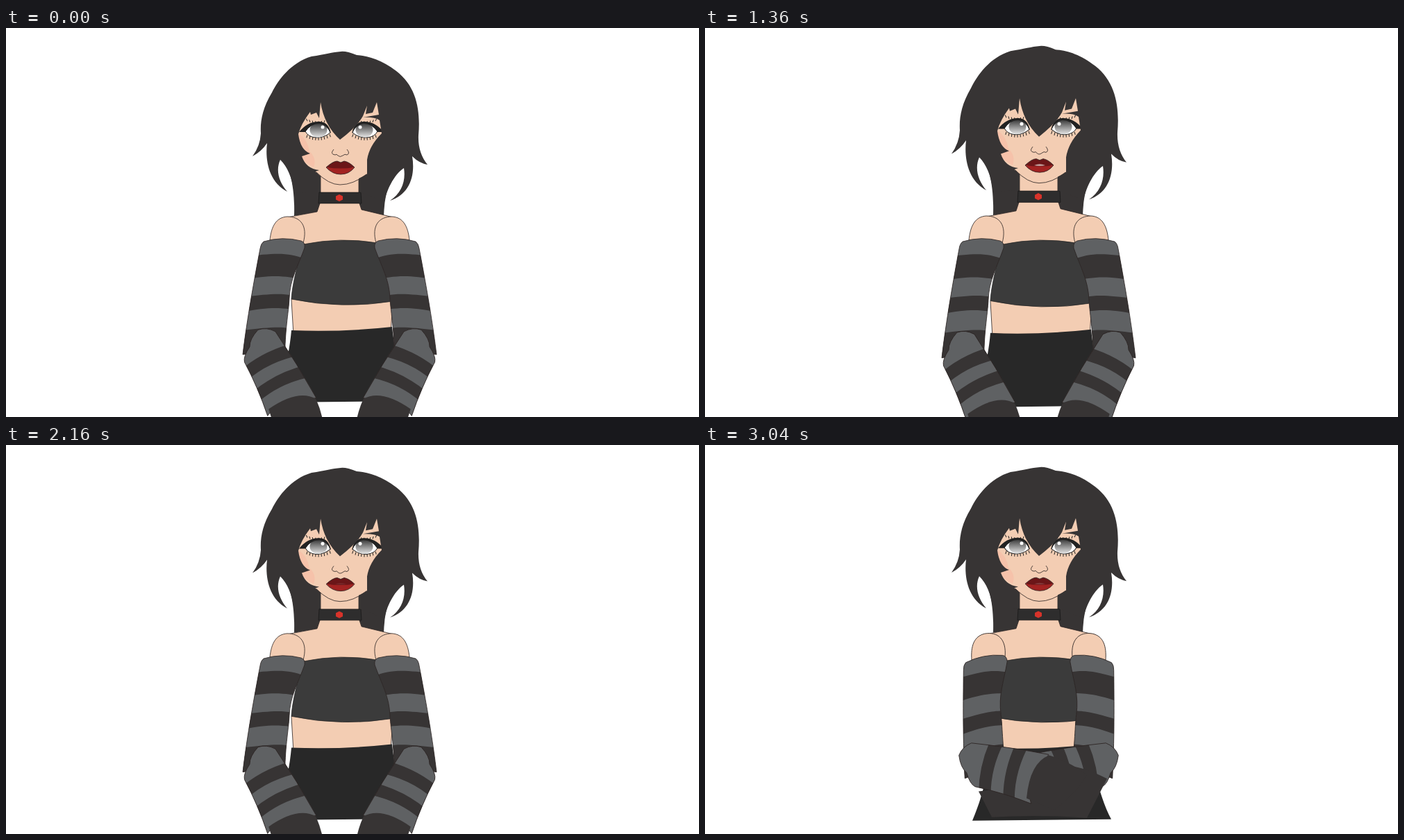
An HTML page for the animation above (3.08 s loop, 998x561 px).

```html
<!DOCTYPE html>
<html lang="en">
<head>
<meta charset="utf-8">
<title>Striped sleeves</title>
<style>
html, body { margin: 0; width: 100%; height: 100%; overflow: hidden; background: #fff; }
svg { display: block; width: 100vw; height: 100vh; }
.line { fill: none; stroke: #2b2322; stroke-width: .8; }
.skin { fill: #f3cdb3; stroke: #2b2322; stroke-width: .8; }
.dark { fill: #373434; }
.gray { fill: #5f6163; }
</style>
</head>
<body>
<svg viewBox="0 0 998 561">
  <defs>
    <linearGradient id="iris" x1="0" y1="0" x2="0" y2="1">
      <stop offset=".1" stop-color="#444"/><stop offset="1" stop-color="#e4e4e4"/>
    </linearGradient>
    <path id="sleeve" d="M531 317Q530 309 536 307Q563 300 590 308Q594 311 595 318C603 360 614 420 620 471Q590 463 559 475C560 440 554 410 553 390C552 362 541 345 531 317Z"/>
    <path id="cuff" d="M-26 25Q-20 8 -10 3Q-2 -12 6 -14Q48 -14 90 -21L84 -8L100 53Q45 52 -12 46Q-24 38 -26 25Z"/>
    <clipPath id="sleeveClip"><use href="#sleeve"/></clipPath>
    <clipPath id="cuffClip"><use href="#cuff"/></clipPath>
    <g id="upperArm">
      <path class="skin" d="M533 310C526 285 537 272 556 272C572 273 579 286 581 306Z"/>
      <use href="#sleeve" class="gray"/>
      <g id="sleeveBands" class="dark" clip-path="url(#sleeveClip)"></g>
      <use href="#sleeve" class="line"/>
    </g>
    <g id="forearm">
      <use href="#cuff" class="gray"/>
      <g id="cuffBands" class="dark" clip-path="url(#cuffClip)"></g>
      <use href="#cuff" class="line"/>
      <path class="dark" d="M82 -15L124 -23Q150 4 160 36Q130 50 101 52Q76 36 82 -15Z"/>
    </g>
    <g id="eye">
      <path fill="#fff" stroke="#222" d="M-18 1Q-10 -11 3 -11Q14 -10 18 3Q8 11 -3 10Q-14 9 -18 1Z"/>
      <ellipse cx="1" cy="-1" rx="12.5" ry="10.5" fill="url(#iris)"/>
      <circle cx="7" cy="-5" r="2.5" fill="#fff"/>
      <path fill="#222" d="M-27 2Q-14 -14 3 -13Q16 -12 19 4Q12 -9 2 -10Q-10 -10 -18 2Z"/>
      <path class="lashes" stroke="#222" fill="none"/>
    </g>
  </defs>

  <g id="figure">
    <path class="dark" d="M388 170C412 200 416 235 415 271L480 260L544 271C545 240 552 215 576 180Z"/>
    <path class="skin" d="M453 205V250L448 265L400 274L425 330L411 392L414 442H554L557 392L538 330L562 274L512 262L508 250V205Z"/>
    <path fill="#3b3b3b" stroke="#222" stroke-width=".7" d="M428 312Q482 301 535 310C545 335 562 345 566 362L558 394Q484 406 411 391C412 370 420 340 428 312Z"/>
    <path fill="#282828" d="M411 436Q482 439 556 431C560 470 570 510 585 538L385 540C400 505 408 470 411 436Z"/>
    <path fill="#2e2d2d" stroke="#111" stroke-width=".6" d="M451 237H511L512 253H450Z"/>
    <path fill="#d8332a" d="M480 240L485 242.500V247.500L480 250L475 247.500V242.500Z"/>

    <g id="head">
      <path fill="#f3cdb3" d="M420 100H543V190L519 211Q500 226 481 226Q465 226 447 208L420 190Z"/>
      <path fill="#f6c2aa" d="M421 152Q434 160 437 178Q448 188 443 201L425 190Z"/>
      <path class="line" d="M447 208Q465 226 481 226Q500 226 519 211"/>
      <path class="line" d="M472 175Q466 182 474 183Q476 181 478 184Q481 187 485 184Q488 181 491 183Q496 181 491 175"/>
      <use href="#eye" x="449" y="148"/>
      <use href="#eye" transform="translate(517 148) scale(-1 1)"/>
      <path fill="#6b1618" d="M461 201Q471 192 477 192L482 194L487 192Q494 193 502 201Q482 207 461 201Z"/>
      <path fill="#a22322" d="M461 201Q482 204 502 201Q494 211 482 211Q470 211 461 201Z"/>
      <path class="line" d="M461 201Q471 192 477 192L482 194L487 192Q494 193 502 201Q494 211 482 211Q470 211 461 201Z"/>
      <path id="teeth" fill="#d9c4c0" d="M474 201Q482 198 490 201Q482 203 474 201Z"/>
      <path class="dark" d="M482 34C470 35 460 38 440 41C410 50 392 75 383 93C369 116 366 135 367 152Q366 170 355 185Q368 178 376 166C373 190 378 222 405 236C393 222 388 205 395 190C405 200 412 215 415 238L453 236V214L443 208L451 205Q432 203 426 185L438 181Q424 176 421 153Q425 138 438 121L439 125L447 122L451 130L453 107Q458 140 481 161Q505 143 514 127L520 112L518 124L528 122L534 107L537 125L514 129Q530 128 538 133L541 152Q523 170 520 190V211L508 217V236L545 250C548 235 558 212 573 202C576 220 570 238 553 249C580 240 590 215 585 185Q595 195 607 197Q593 180 594 155C597 120 592 85 562 62C540 45 520 40 505 39Q490 33 482 34Z"/>
    </g>

    <g id="rightArm"><use href="#upperArm"/><use href="#forearm" class="fore"/></g>
    <path id="folded" class="dark" d="M394 498L413 535Q480 531 550 536L579 480Q545 462 518 461L470 490Z"/>
    <g transform="translate(961 0) scale(-1 1)">
      <g id="leftArm"><use href="#upperArm"/><use href="#forearm" class="fore"/></g>
    </g>
  </g>
</svg>
<script>
const LOOP = 3080, STEP = 40;
const $ = id => document.getElementById(id);

// Keys are [time, value] pairs
const stretchKeys = [[0, 0], [80, 0], [240, 28], [340, 17], [440, 9], [580, 0], [800, 12], [920, 6],
  [1000, 4], [1120, 0], [1290, 12], [1360, 8], [1500, 2], [1560, 0], [1640, 6], [1780, 24], [1880, 17],
  [1980, 9], [2120, 0], [2340, 12], [2480, 6], [2640, 0], [2840, 12], [2900, 10], [3040, 2], [3080, 0]];
const swingKeys = [[0, 0], [90, 0], [240, 1.25], [340, .95], [440, .64], [600, 0],
  [1570, 0], [1780, 1.25], [1880, 1], [1980, .62], [2140, 0], [3080, 0]];
const foldKeys = [[0, 0], [1390, 0], [1480, 1], [1530, 1], [1560, 0], [2880, 0], [3000, 1], [3080, 1]];

// Smooth curve through the keys, flat at peaks and rests
function slope(keys, i) {
  const a = keys[i - 1], b = keys[i], c = keys[i + 1];
  if (!a || !c || (b[1] - a[1]) * (c[1] - b[1]) <= 0) return 0;
  return (c[1] - a[1]) / (c[0] - a[0]);
}
function sample(keys, t) {
  const i = keys.findIndex((k, n) => n > 0 && t <= k[0]);
  const [t0, a] = keys[i - 1], [t1, b] = keys[i];
  const span = t1 - t0, u = (t - t0) / span, v = 1 - u;
  return v * v * (1 + 2 * u) * a + u * u * (3 - 2 * u) * b
    + span * u * v * (v * slope(keys, i - 1) - u * slope(keys, i));
}

$('sleeveBands').innerHTML = [[327, 361], [385, 407], [433, 480]].map(([top, end]) =>
  `<path d="M520 ${top + 10}C555 ${top - 4} 565 ${top - 4} 635 ${top + 5}V${end + 6}C575 ${end - 8} 560 ${end - 3} 520 ${end + 4}Z"/>`).join('');
$('cuffBands').innerHTML = [[10, 28], [46, 63]].map(([from, to]) =>
  `<path d="M${from + 5} -30Q${from - 7} 15 ${from + 6} 65H${to + 8}Q${to - 8} 15 ${to + 5} -30Z"/>`).join('');
document.querySelector('.lashes').setAttribute('d',
  Array.from({ length: 9 }, (_, i) => {
    const x = i * 4 - 15, y = 10 - x * x / 60;
    return `M${x} ${y}l${x / 12} 4M${x} ${y - 20}l${x / 9} -3.500`;
  }).join(''));

function poseArm(id, shoulder, elbow) {
  const arm = $(id);
  arm.setAttribute('transform', `rotate(${shoulder} 555 285)`);
  arm.querySelector('.fore').setAttribute('transform',
    `translate(608 470) rotate(${118 + elbow - shoulder})`);
}

function draw(t) {
  const stretch = sample(stretchKeys, t);
  const swing = sample(swingKeys, t), fold = sample(foldKeys, t);
  $('figure').setAttribute('transform', `translate(0 306) scale(1 ${1 + stretch / 272}) translate(0 -306)`);
  $('head').setAttribute('transform', `rotate(${-4 * swing} 482 200)`);
  poseArm('rightArm', 10 * fold - 14 * swing, 50 * fold - 89 * swing);
  poseArm('leftArm', 10 * fold, 50 * fold);
  $('folded').setAttribute('visibility', fold > .95 ? 'visible' : 'hidden');
  $('teeth').setAttribute('opacity', Math.min(1, stretch / 10));
}

const start = performance.now();
function tick() {
  const t = (performance.now() - start) % LOOP;
  draw(Math.floor(t / STEP) * STEP);
  requestAnimationFrame(tick);
}
tick();
</script>
</body>
</html>
```
